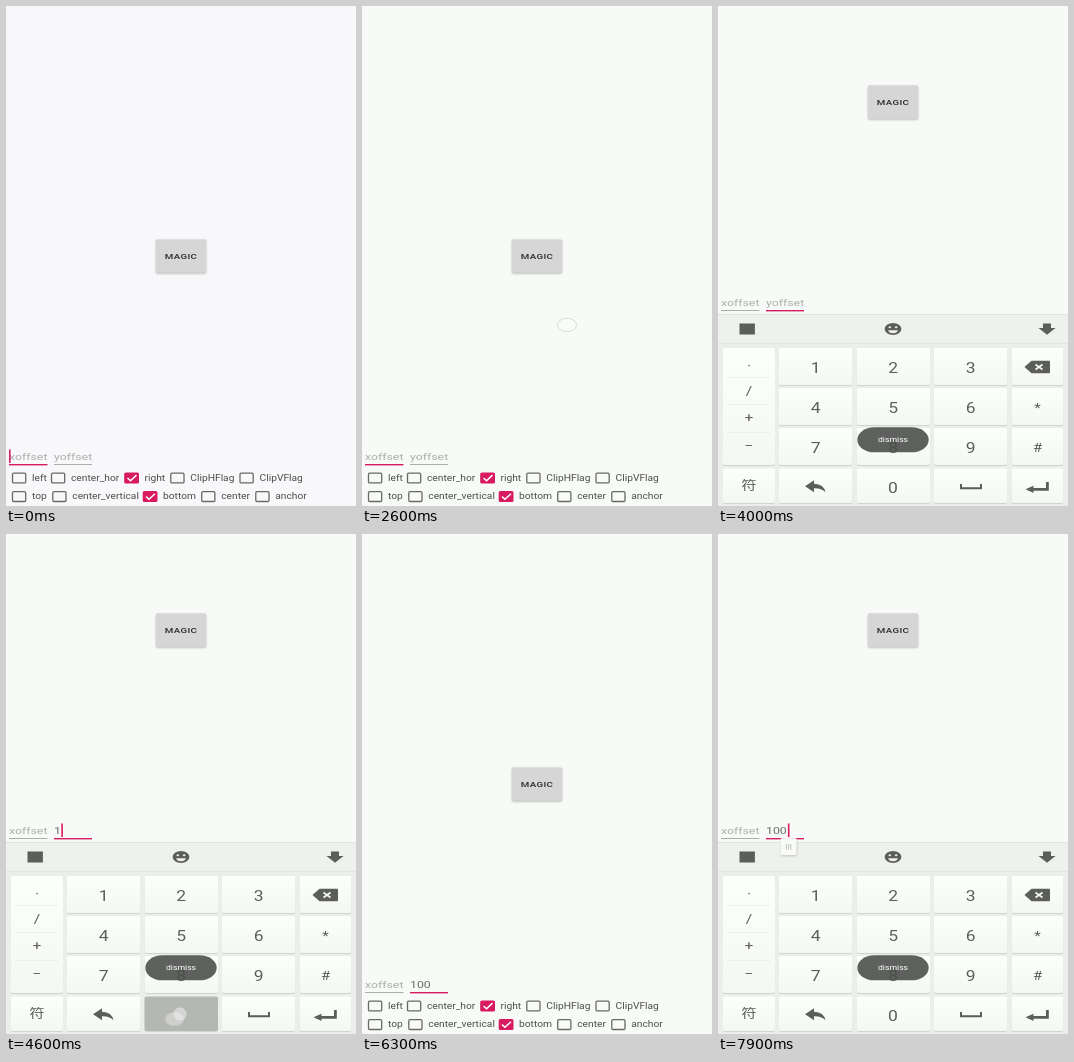
An HTML page for the animation above (8 s loop, 350 px wide and 500 px high).

```html
<!DOCTYPE html>
<html>
<head>
<meta charset="utf-8">
<style>
html, body { margin: 0; width: 100%; height: 100%; overflow: hidden; background: #f8faf7; }
svg { display: block; width: 350px; height: 500px; font-family: Roboto, "Noto Sans CJK SC", "Noto Sans CJK", sans-serif; }
</style>
</head>
<body>
<svg id="stage" viewBox="0 0 350 500"></svg>
<script>
const LOOP = 8000, PAN = 154, STRETCH = 1.25;
const ink = '#5c5e5c', pink = '#d81b60', grey = '#acaeac';

// The phone screen is shown 1.25 times too wide, so all lettering is too.
const text = (x, y, size, str, fill, extra = '') =>
  `<text transform="translate(${x} ${y}) scale(${STRETCH} 1)" font-size="${size}" fill="${fill}" ${extra}>${str}</text>`;
const mid = (x, y, size, str, fill = ink, extra = '') =>
  text(x, y, size, str, fill, 'text-anchor="middle" ' + extra);
const rect = (x, y, w, h, fill, extra = '') =>
  `<rect x="${x}" y="${y}" width="${w}" height="${h}" fill="${fill}" ${extra}/>`;
const path = (d, fill = ink, extra = '') => `<path d="${d}" fill="${fill}" ${extra}/>`;
const oval = (x, y, rx, ry, fill, extra = '') =>
  `<ellipse cx="${x}" cy="${y}" rx="${rx}" ry="${ry}" fill="${fill}" ${extra}/>`;

function check(x, y, label, on) {
  const box = on
    ? rect(x - .3, y - 5.5, 14.8, 11, pink, 'rx="1.6"') +
      path(`M${x + 3} ${y}l3 2.7l6-5.6`, 'none', 'stroke="#fff" stroke-width="1.5"')
    : rect(x + .5, y - 4.9, 13.2, 9.8, 'none', 'stroke="#686a68" stroke-width="1.3" rx="1.2"');
  return box + text(x + 20, y + 2.8, 8.2, label, '#4c4e4c');
}

const key = (x, y, w, h) =>
  rect(x, y + .8, w, h, '#c9cbc8', 'rx="1.8"') + rect(x, y, w, h, 'url(#cap)', 'rx="1.8"');

function keyboard() {
  const cols = [61, 138.5, 216], rows = [342, 382, 422];
  let s = rect(0, 308, 350, 192, '#eceeeb') + rect(0, 308, 350, 29, '#eff1ee') +
    rect(0, 308, 350, .8, '#dfe1de') + rect(0, 337, 350, .8, '#e2e4e1');
  // toolbar
  s += rect(21.5, 317.5, 15.4, 11, ink) + oval(175, 323, 8.4, 6, ink) +
    oval(171.8, 321.2, 1.3, 1, '#eff1ee') + oval(178.2, 321.2, 1.3, 1, '#eff1ee') +
    path('M170 324.2h10q-1 3-5 3t-5-3z', '#eff1ee') +
    path('M325 317.5h8v4.5h4.5l-8.5 6.8l-8.5-6.8h4.5z');
  // side column
  s += key(5, 342, 52, 117);
  for (const y of [371, 398.5, 426]) s += rect(9, y, 44, .6, '#e8eae7');
  ['·', '/', '+', '−'].forEach((c, i) => s += mid(31, [364, 389, 416, 444][i], 12.5, c));
  // digits
  rows.forEach((y, r) => {
    cols.forEach((x, c) => s += key(x, y, 73.5, 37) + mid(x + 36.7, y + 25, 14, r * 3 + c + 1));
    s += key(293.5, y, 52, 37);
  });
  s += path('M306.5 361l7-6.2h17.5q1 0 1 1v10.4q0 1-1 1h-17.5z') +
    path('M317.5 358.5l7 5m0-5l-7 5', 'none', 'stroke="#f6f8f5" stroke-width="1.6"') +
    mid(319.5, 406, 12, '*') + mid(319.5, 446, 12, '#');
  // bottom row
  for (const [x, w] of [[5, 52], [61, 73.5], [138.5, 73.5], [216, 73.5], [293.5, 52]]) s += key(x, 462.5, w, 34.5);
  s += mid(31, 484, 12.4, '符') + mid(175, 486.5, 14, 0) +
    path('M87 480.3l9-6v3.4q10 .4 11.5 8.6q-4-4.2-11.5-4v4z') +
    path('M243 478v4.2h20v-4.2', 'none', `stroke="${ink}" stroke-width="2"`) +
    path('M307.5 483.3l8-3.6v2.2h12.5v-6h2.8v8.8h-15.3v2.2z');
  return s + rect(0, 0, 73.5, 37, '#b5b7b4', 'id="press" rx="1.8"');
}

const top5 = ['left', 'center_hor', 'right', 'ClipHFlag', 'ClipVFlag'];
const low5 = ['top', 'center_vertical', 'bottom', 'center', 'anchor'];

stage.innerHTML = `<defs>
  <linearGradient id="cap" x2="0" y2="1"><stop stop-color="#fdfffc"/><stop offset="1" stop-color="#f5f7f4"/></linearGradient>
  <filter id="soft" x="-20%" y="-20%" width="140%" height="150%"><feGaussianBlur stdDeviation="1"/></filter></defs>
  ${rect(0, 0, 350, 500, '#1c1c1c')}
  <g id="page">${rect(0, 0, 350, 500, '#f8faf7', 'id="back"')}
    ${rect(150, 234.3, 50, 33.5, '#b9bbb9', 'rx="1.5" filter="url(#soft)"')}
    ${rect(149.8, 233.4, 50.4, 33.4, '#d5d6d5', 'id="button" rx="1.5"')}
    ${mid(175, 253, 7.8, 'MAGIC', '#2a2c2a', 'font-weight="500" letter-spacing=".3"')}
    ${text(3, 454.2, 9.85, 'xoffset', grey)}
    ${text(48, 454.2, 9.85, 'yoffset', grey, 'id="entry"')}
    ${rect(3, 458, 38.5, 1, grey, 'id="lineX"')}${rect(48, 458, 38, 1, grey, 'id="lineY"')}
    ${rect(0, 443.5, 1.6, 13.5, pink, 'id="caret"')}
    ${[6, 45, 118.5, 164.3, 233.5].map((x, i) => check(x, 472, top5[i], i == 2)).join('')}
    ${[6, 46.3, 137, 195.2, 249.3].map((x, i) => check(x, 490.6, low5[i], i == 2)).join('')}
  </g>
  <g id="keys">${keyboard()}</g>
  <g id="handle">${rect(63, 1, 16, 17, '#bbb', 'rx="1.5" filter="url(#soft)"')}${rect(62.6, 0, 16, 17, '#fafcf9', 'rx="1.5"')}
    ${path('M68.4 6v5.5m2.2-5.5v5.5m2.2-5.5v5.5', 'none', 'stroke="#b0b2b0" stroke-width=".9"')}</g>
  <g id="toast">${rect(139.3, 421.3, 71.4, 25, '#484a48', 'rx="17" ry="12.5" fill-opacity=".87"')}
    ${mid(175, 435.8, 6.95, 'dismiss', '#fff')}</g>
  <g id="touch">${oval(0, 0, 9.4, 6.7, '#fff', 'fill-opacity=".35" stroke="#c6c8c6" stroke-opacity=".7" stroke-width=".9"')}</g>
  <g id="twin">${oval(174, 480, 6, 6, '#fff', 'fill-opacity=".4" stroke="#e6e8e6" stroke-width=".8"')}</g>`;

const el = id => document.getElementById(id);
const set = (id, name, value) => el(id).setAttribute(name, value);
const show = (id, v) => set(id, 'opacity', +v);
const ramp = (t, start, span) => Math.min(1, Math.max(0, (t - start) / span));
const ease = (t, start, span, power) => 1 - (1 - ramp(t, start, span)) ** power;
const within = (t, list) => list.some(([a, b]) => t >= a && t < b);

const OPEN = [3296, 7039], CLOSE = 5153;
const panAt = t => PAN * (ease(t, OPEN[0], 222, 5) - ease(t, CLOSE, 222, 5) + ease(t, OPEN[1], 222, 5));

// x, y, down, up
const touches = [
  [176, 254, 800, 1000], [205, 319, 2560, 2740], [68, 451, 2960, 3140],
  [97, 364, 4220, 4380], [168.5, 485, 4520, 4680], [168.5, 485, 4780, 4920],
  [326, 324, 4960, 5080], [176, 254, 5560, 5720], [78, 451, 6800, 7140]
];
const presses = [[61, 342, 37, 4220, 4380], [138.5, 462.5, 34.5, 4520, 4680], [138.5, 462.5, 34.5, 4780, 4920]];
const blink = [[0, 200], [700, 1200], [1700, 2200], [3000, 3600], [4200, 5200], [5800, 6300], [6800, 8000]];

function draw(t) {
  const pan = panAt(t);
  set('page', 'transform', `translate(0 ${-pan})`);
  set('back', 'fill', t < 1200 ? '#f8f7fa' : '#f8faf7');
  set('button', 'fill', within(t, [[1000, 1250], [5600, 5850]]) ? '#c6c7c6' : '#d5d6d5');

  // fields
  const onY = t >= 3000;
  const typed = t < 4380 ? '' : t < 4680 ? '1' : t < 4920 ? '10' : '100';
  el('entry').textContent = typed || 'yoffset';
  set('entry', 'fill', typed ? '#6a6c6a' : grey);
  for (const [id, on] of [['lineX', !onY], ['lineY', onY]]) {
    set(id, 'fill', on ? pink : grey);
    set(id, 'height', on ? 1.4 : 1);
  }
  set('caret', 'x', onY ? 48 + typed.length * 7.3 : 3);
  show('caret', within(t, blink));

  // keyboard slides and fades
  const start = t < 6500 ? OPEN[0] : OPEN[1];
  const out = t < 6500 ? ramp(t, 5080, 150) : 0;
  const drop = 35 * (1 - ease(t, start - 18, 200, 5) + out);
  set('keys', 'transform', `translate(0 ${drop})`);
  show('keys', ease(t, start - 44, 172, 2) * (1 - out));
  const hit = presses.find(p => t >= p[3] && t < p[4]);
  show('press', !!hit);
  if (hit) {
    set('press', 'transform', `translate(${hit[0]} ${hit[1]})`);
    set('press', 'height', hit[2]);
  }

  set('handle', 'transform', `translate(0 ${458 - panAt(t - 38)})`);
  show('handle', t < 7000 ? 0 : .9);
  show('toast', ramp(t, 2700, 250) - ramp(t, 4700, 250) + ramp(t, 6900, 270));

  const tap = touches.find(p => t >= p[2] && t < p[3]);
  show('touch', !!tap);
  if (tap) set('touch', 'transform', `translate(${tap[0]} ${tap[1]})`);
  show('twin', within(t, [[4560, 4680]]));
}

function tick() {
  draw(performance.now() % LOOP);
  requestAnimationFrame(tick);
}
tick();
</script>
</body>
</html>
```
